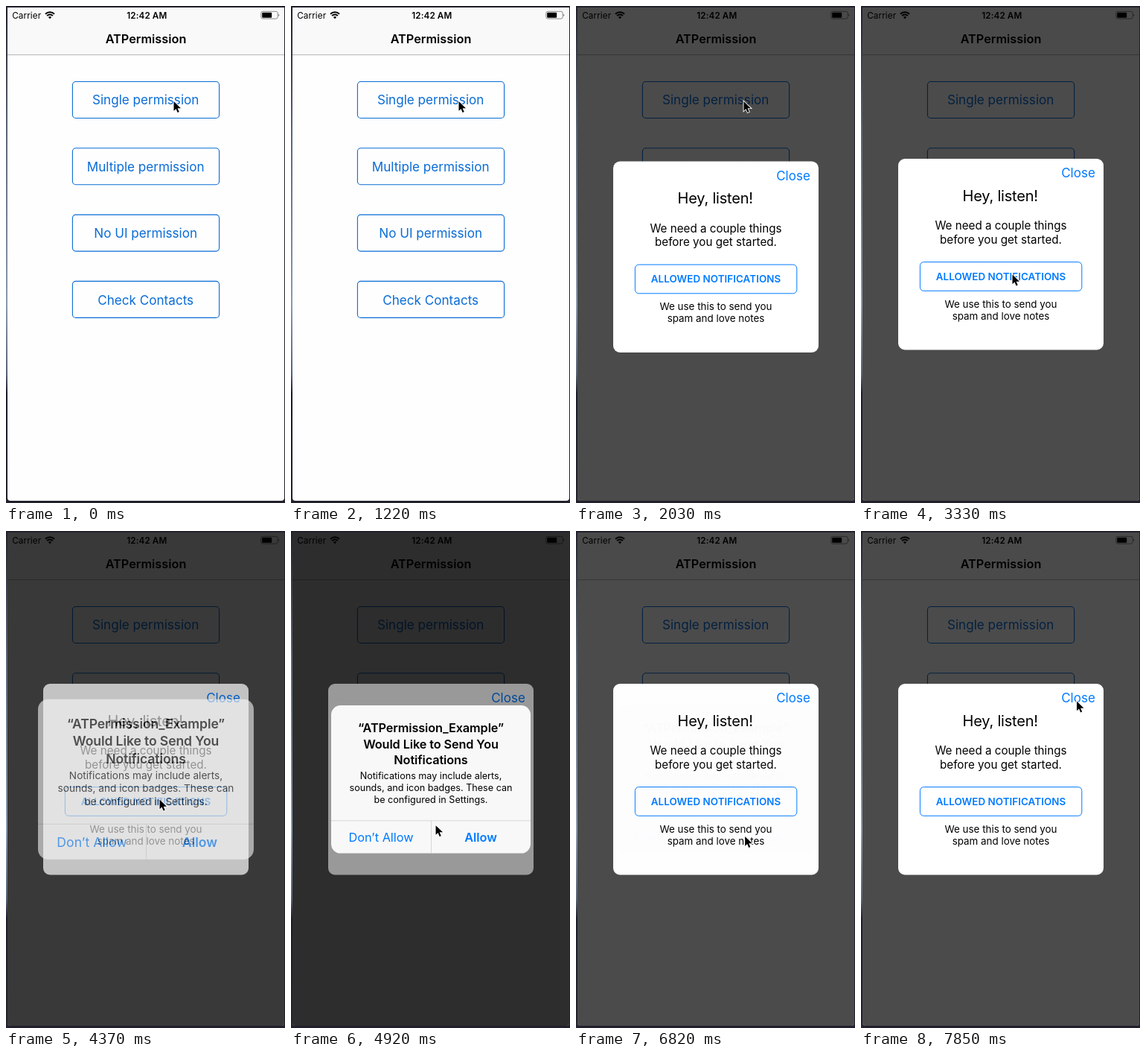
Write an HTML page that moves like this. It is 375 px wide and 667 px high and loops after 8000 ms.

```html
<!DOCTYPE html>
<html lang="en">
<head>
<meta charset="utf-8">
<title>Permission dialog</title>
<style>
  html, body { margin: 0; width: 100%; height: 100%; overflow: hidden; background: #1d2030; }
  svg { display: block; width: 375px; height: 667px; }
  text { font: 15.2px Inter, Roboto, "Liberation Sans", sans-serif; text-anchor: middle; }
  .semi { font-weight: 600; }
  .bar text { font-size: 11.7px; letter-spacing: .1px; }
  .title { font-size: 16.3px; }
  .menu text { font-size: 17.1px; fill: #0a6cd6; }
  .menu rect { fill: none; stroke: #0a6cd6; stroke-width: 1.1; }
  .small { font-size: 13.4px; }
  .blue { fill: #007aff; }
  #alert .head { font-size: 16.25px; letter-spacing: -.1px; }
  #alert .note { font-size: 12.6px; }
  #alert .action { font-size: 16.3px; }
</style>
</head>
<body>
<svg viewBox="0 0 375 667">
  <defs>
    <linearGradient id="edge" x2="0" y2="1">
      <stop offset="0" stop-color="#20212c"/>
      <stop offset=".25" stop-color="#5c6878"/>
      <stop offset=".6" stop-color="#8d9cae"/>
      <stop offset=".74" stop-color="#5a6678"/>
      <stop offset=".78" stop-color="#1b1e2c"/>
      <stop offset="1" stop-color="#23242e"/>
    </linearGradient>
    <path id="window" d="M2 2H374V660a4 4 0 0 1-4 4H6a4 4 0 0 1-4-4z"/>
  </defs>

  <rect width="375" height="667" fill="#20212c"/>
  <rect width="2" height="667" fill="url(#edge)"/>
  <use href="#window" fill="#fefefe"/>
  <path d="M2 2H374V65H2z" fill="#f9f9f9"/>
  <path d="M2 65.5H374" stroke="#b5b5b5"/>
  <text x="188" y="49.6" class="title semi">ATPermission</text>

  <g class="menu">
    <rect x="89.4" y="101.5" width="197.2" height="49" rx="4.5"/>
    <text x="187.7" y="132.4">Single permission</text>
    <rect x="89.4" y="190.8" width="197.2" height="49" rx="4.5"/>
    <text x="187.7" y="221.8">Multiple permission</text>
    <rect x="89.4" y="280.1" width="197.2" height="49" rx="4.5"/>
    <text x="187.7" y="311.2">No UI permission</text>
    <rect x="89.4" y="369.4" width="197.2" height="49" rx="4.5"/>
    <text x="187.7" y="400.6">Check Contacts</text>
  </g>

  <g id="modal">
    <use href="#window" opacity=".7"/>
    <g id="card">
      <rect x="50" y="205" width="276" height="256.5" rx="9" fill="#fff"/>
      <text x="292" y="230" class="blue" style="font-size:17px">Close</text>
      <text x="187.2" y="261.7" style="font-size:20px;letter-spacing:-.2px">Hey, listen!</text>
      <text x="188" y="300">We need a couple things</text>
      <text x="188" y="318.7">before you get started.</text>
      <rect x="79.4" y="343.6" width="217.4" height="38.7" rx="5" fill="none" stroke="#007aff"/>
      <text x="188" y="367.9" class="small semi blue" style="letter-spacing:.05px">ALLOWED NOTIFICATIONS</text>
      <text x="188" y="404.7" class="small">We use this to send you</text>
      <text x="188" y="420.9" class="small">spam and love notes</text>
    </g>
  </g>

  <!-- The status bar stays above the dialog -->
  <g class="bar">
    <text x="27.7" y="16.5">Carrier</text>
    <text x="189.3" y="16.5" class="semi">12:42 AM</text>
    <path d="M53 10.7a8.5 8.5 0 0 1 12 0M55.1 13.1a5.5 5.5 0 0 1 7.8 0" fill="none" stroke="#000" stroke-width="2"/>
    <path d="M59 17.2l-2.1-2.2a3 3 0 0 1 4.2 0z"/>
    <g opacity=".5">
      <rect x="342.8" y="7.3" width="22.4" height="9.8" rx="2.3" fill="none" stroke="#000" stroke-width=".9"/>
      <path d="M366.2 10.4q2.2 1.8 0 3.6z"/>
    </g>
    <rect x="344.2" y="8.7" width="13" height="7" rx="1"/>
  </g>

  <use id="shade" href="#window"/>
  <g id="alert">
    <rect x="54" y="234" width="268" height="198.6" rx="12.5" fill="#f8f8f8"/>
    <path id="pressed" d="M188.5 389H322V420.1a12.5 12.5 0 0 1-12.5 12.5H188.5z" fill="#e6e6e6"/>
    <path d="M54 388.8H322M188.5 388.8V432.6" stroke="#cfcfd2" stroke-width=".8"/>
    <text x="188" y="269.9" class="head semi">“ATPermission_Example”</text>
    <text x="188" y="291.6" class="head semi">Would Like to Send You</text>
    <text x="188" y="313.4" class="head semi">Notifications</text>
    <text x="188" y="333" class="note">Notifications may include alerts,</text>
    <text x="188" y="349" class="note">sounds, and icon badges. These can</text>
    <text x="188" y="365" class="note">be configured in Settings.</text>
    <text x="121" y="417" class="action blue">Don’t Allow</text>
    <text x="255" y="417" class="action semi blue">Allow</text>
  </g>

  <path id="cursor" d="M1 1.5V14.2L4 11.4 6.1 16.4 8.2 15.5 6.1 10.7H10.5z"
        stroke="#fff" stroke-width="1.8" paint-order="stroke"/>
</svg>
<script>
const LOOP = 8000;
const el = id => document.getElementById(id);
const set = (id, name, value) => el(id).setAttribute(name, value);

// Eased progress of t between a and b
function ease(t, a, b) {
  const x = Math.min(1, Math.max(0, (t - a) / (b - a)));
  return x * x * (3 - 2 * x);
}

// Critically damped spring started at a
function spring(t, a) {
  const x = Math.max(0, t - a) * 0.028;
  return 1 - (1 + x) * Math.exp(-x);
}

// Pointer stops: time, x, y
const stops = [
  [0, 224.5, 126.5], [2200, 224.5, 126.5], [2920, 205, 341], [3070, 205, 341],
  [3330, 202.5, 359], [4170, 202.5, 359], [4200, 205.5, 359], [4480, 205.5, 359],
  [5120, 190, 404], [5540, 190, 404], [5570, 191, 405], [5810, 191, 405],
  [6100, 219, 408], [6300, 226, 409], [6800, 226, 409], [7400, 271, 279],
  [7850, 289, 227], [LOOP, 289, 227]
];

function pointer(t) {
  const i = stops.findIndex(s => s[0] > t);
  const [a, x, y] = stops[i - 1], [b, x2, y2] = stops[i];
  const k = ease(t, a, b);
  return [x + (x2 - x) * k, y + (y2 - y) * k];
}

function draw(t) {
  // The card drops 15px past its place, then settles
  const drop = ease(t, 1720, 1902), settle = ease(t, 1902, 2090);
  set('modal', 'opacity', drop);
  set('card', 'transform', `translate(0 ${-661 + 676 * drop - 15 * settle})`);

  const show = spring(t, 4300), fade = show * (1 - spring(t, 6595));
  const scale = 1.2 - 0.2 * show;
  set('shade', 'opacity', 0.4 * fade);
  set('alert', 'opacity', fade);
  set('alert', 'transform', `translate(188 333.3) scale(${scale}) translate(-188 -333.3)`);
  set('pressed', 'opacity', t >= 6380 ? 1 : 0);

  set('cursor', 'transform', `translate(${pointer(t)})`);
}

function tick() {
  draw(performance.now() % LOOP);
  requestAnimationFrame(tick);
}
tick();
</script>
</body>
</html>
```
